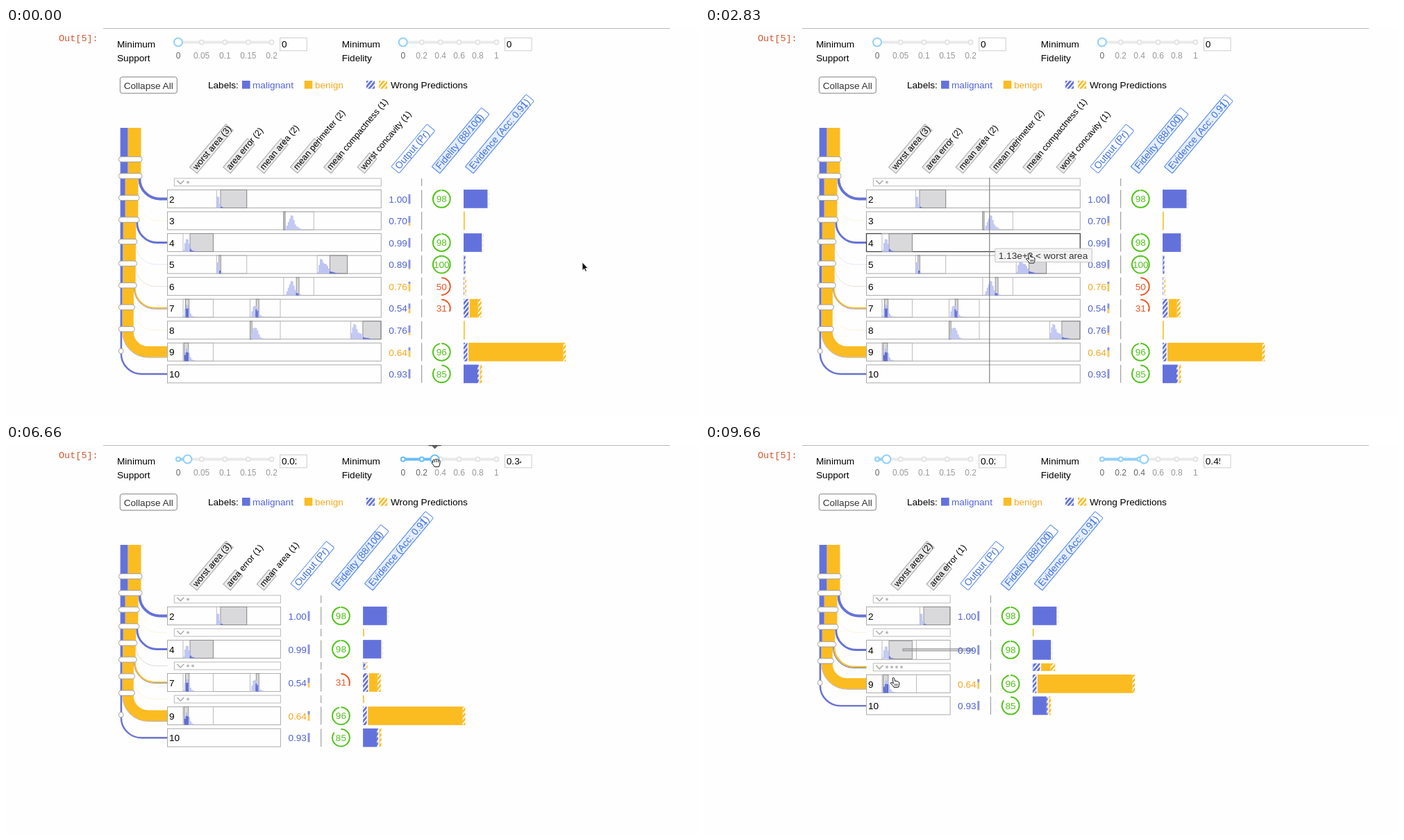
These frames come from a looping animation (998x561 px, 9.83 s). An HTML page:

```html
<!DOCTYPE html>
<html lang="en">
<head>
<meta charset="utf-8">
<title>Rule matrix</title>
<style>
html, body { margin: 0; width: 100%; height: 100%; overflow: hidden; background: #fefefe; }
svg { display: block; font: 13.6px "Liberation Sans", Arial, sans-serif; }
.out { font: 13.5px "Liberation Mono", monospace; }
.mark { font-size: 12px; text-anchor: middle; }
.mid { text-anchor: middle; }
.tick { font-size: 9.6px; }
</style>
</head>
<body>
<svg width="998" height="561" viewBox="0 0 998 561">
  <defs>
    <pattern id="blueStripe" width="4.6" height="4.6" patternUnits="userSpaceOnUse" patternTransform="rotate(40)">
      <rect width="2.9" height="4.6" fill="#6372db"/>
    </pattern>
    <pattern id="goldStripe" width="4.6" height="4.6" patternUnits="userSpaceOnUse" patternTransform="rotate(40)">
      <rect width="2.7" height="4.6" fill="#fbbc22"/>
    </pattern>
  </defs>
  <g id="scene"></g>
</svg>
<script>
const BLUE = '#6372db', GOLD = '#fbbc22', BLUE_TEXT = '#5163d6', GOLD_TEXT = '#f5a81c';
const LOOP = 9830, MOVE = 500, COL = 48.3, CELL = 43.4, GROW_X = 87, GROW_Y = 27;

// Per rule: probability, class (0 blue, 1 gold), fidelity,
// evidence [blue, blue wrong, gold, gold wrong], cells [column, from, to].
const RULES = {
  1: { ev: [0, 0, 0, 0] },
  2: { pr: '1.00', cls: 0, fid: 98, ev: [34.5, 0, 0, 1.2], cells: [[1, .13, 1]] },
  3: { pr: '0.70', cls: 0, ev: [0, 0, 1.6, 0], cells: [[3, 0, .05]] },
  4: { pr: '0.99', cls: 0, fid: 98, ev: [26.3, 0, 0, 1.2], cells: [[0, .23, 1]] },
  5: { pr: '0.89', cls: 0, fid: 100, ev: [.6, 2, 0, 0], cells: [[1, .08, .14], [4, .42, 1]] },
  6: { pr: '0.76', cls: 1, fid: 50, ev: [0, .8, 0, 1.6], cells: [[3, .42, .51]] },
  7: { pr: '0.54', cls: 0, fid: 31, ev: [0, 7.2, 12, 5], cells: [[0, .08, .2], [2, .2, .29]] },
  8: { pr: '0.76', cls: 0, ev: [0, 0, 1.6, 0], cells: [[2, 0, .06], [5, .4, 1]] },
  9: { pr: '0.64', cls: 1, fid: 96, ev: [0, 5.5, 136.5, 3.8], cells: [[0, .03, .18]] },
  10: { pr: '0.93', cls: 0, fid: 85, ev: [20, 1.8, 1, 2.2], cells: [] }
};
const FEATURES = ['worst area', 'area error', 'mean area', 'mean perimeter', 'mean compactness', 'worst concavity'];
const SHAPES = [[.11, 3], [.045, 1.8], [.15, 4], [.24, 6], [.16, 2], [.1, .9]];
const STAGES = [
  { hidden: [1], counts: [3, 2, 2, 2, 1, 1] },
  { hidden: [1, 3, 5, 6, 8], counts: [3, 1, 1] },
  { hidden: [1, 3, 5, 6, 7, 8], counts: [2, 1] }
];
const STAGE_START = [0, 4850, 7080];
const EXPANDS = [[1146, 2250], [8400, 9296]];
const POINTER = [
  [0, 830, 338], [500, 600, 326], [830, 400, 314], [1000, 300, 314], [1166, 281, 316],
  [2500, 281, 316], [2666, 330, 318], [2833, 466, 325], [3166, 680, 364], [3333, 738, 376],
  [3500, 720, 360], [4000, 400, 110], [4333, 246, 16], [4500, 250, 16], [4666, 261, 17],
  [4850, 261, 17], [5200, 400, 60], [5666, 540, 46], [6000, 571, 18], [6666, 619, 20],
  [7000, 632, 20], [7100, 632, 20], [7500, 440, 160], [8000, 266, 273], [8166, 273, 291],
  [8660, 276, 300], [9166, 274, 318], [9333, 271, 334], [9830, 271, 336]
];
const SUPPORT = [[4350, 0], [4666, .02]];
const FIDELITY = [[6000, 0], [6666, .34], [7000, .45]];

const clamp = v => Math.max(0, Math.min(1, v));
const lerp = (a, b, q) => a + (b - a) * q;
const ease = v => (v = clamp(v)) < .5 ? 4 * v ** 3 : 1 - 4 * (1 - v) ** 3;
const num = v => +v.toFixed(2);

function along(keys, t) {
  if (t <= keys[0][0]) return keys[0].slice(1);
  const i = keys.findIndex(k => k[0] >= t);
  if (i < 0) return keys[keys.length - 1].slice(1);
  const a = keys[i - 1], b = keys[i], q = (t - a[0]) / (b[0] - a[0]);
  return a.slice(1).map((v, j) => lerp(v, b[j + 1], q));
}

const rect = (x, y, w, h, fill = 'none', more = '') =>
  `<rect x="${num(x)}" y="${num(y)}" width="${num(Math.max(0, w))}" height="${num(Math.max(0, h))}" fill="${fill}" ${more}/>`;
const line = (x1, y1, x2, y2, c, w = 1) =>
  `<path d="M${num(x1)} ${num(y1)}L${num(x2)} ${num(y2)}" stroke="${c}" stroke-width="${w}"/>`;
const curve = (d, c, w, more = '') => `<path d="${d}" fill="none" stroke="${c}" stroke-width="${num(w)}" ${more}/>`;
const text = (x, y, s, fill = '#000', more = '') => `<text x="${num(x)}" y="${num(y)}" fill="${fill}" ${more}>${s}</text>`;
const circle = (x, y, r, fill, more = '') => `<circle cx="${num(x)}" cy="${num(y)}" r="${r}" fill="${fill}" ${more}/>`;
const tilted = (x, y, s) => `<g transform="translate(${num(x)} ${num(y)}) rotate(-50)">${s}</g>`;

function slider(x, label, keys, max, marks, t, held) {
  const [v] = along(keys, t), knob = x + v / max * 134.5;
  const blue = held ? '#69bdfb' : '#91d0fb';
  let s = text(x - 88, 28, 'Minimum') + text(x - 88, 48, label);
  s += rect(x, 18.6, 134.5, 3.9, '#e9e9e9') + rect(x, 18.6, knob - x, 3.9, blue);
  marks.forEach((m, i) => {
    const mx = x + 134.5 * i / (marks.length - 1), on = m <= v;
    s += circle(mx, 20.5, 3, '#fff', `stroke="${on ? blue : '#e4e4e4'}" stroke-width="2"`);
    s += text(mx, 44, m, on ? '#666' : '#999', 'class="mark"');
  });
  s += circle(knob, 20.5, 6, '#fff', `stroke="${blue}" stroke-width="2"`);
  if (held) s += `<path d="M${num(knob - 10)} -2h20q0 3.5 -3 3.5h-3l-4 4.2l-4 -4.2h-3q-3 0 -3 -3.5z" fill="#5c5c5c"/>`;
  s += rect(x + 146.7, 14.2, 38.5, 18.6, '#fff', 'stroke="#ccc"');
  return s + `<svg x="${x + 147}" y="14" width="23" height="19">${text(2, 14.3, v ? v.toFixed(2) : '0')}</svg>`;
}

function controls(t) {
  const heldA = t > 4200 && t < 4840, heldB = t > 5950 && t < 7070;
  return line(140, .5, 956, .5, '#b8b8b8') + text(76, 19, 'Out[5]:', '#d0572f', 'class="out"') +
    slider(248, 'Support', SUPPORT, .2, [0, .05, .1, .15, .2], t, heldA) +
    slider(571.8, 'Fidelity', FIDELITY, 1, [0, .2, .4, .6, .8, 1], t, heldB) +
    rect(164.3, 70.7, 82, 23.4, '#fff', 'rx="3" stroke="#808080"') +
    text(205.2, 87.5, 'Collapse All', '#333', 'class="mid"') +
    text(291, 87.3, 'Labels:') +
    rect(340, 76, 11.6, 11.6, BLUE) + text(355, 87.3, 'malignant', BLUE_TEXT) +
    rect(429.7, 76, 11.6, 11.6, GOLD) + text(445, 87.3, 'benign', GOLD_TEXT) +
    rect(519, 76, 12, 11.6, 'url(#blueStripe)') + rect(537, 76, 12, 11.6, 'url(#goldStripe)') +
    text(554, 87.3, 'Wrong Predictions');
}

// Consecutive hidden rules share one thin row.
function stack(stage) {
  const rows = [];
  let top = 216.4;
  for (let id = 1; id <= 10; id++) {
    const full = !STAGES[stage].hidden.includes(id), last = rows[rows.length - 1];
    if (!full && last && !last.full) { last.ids.push(id); continue; }
    const h = full ? 27.05 : 12;
    rows.push({ ids: [id], full, y: top + h / 2 });
    top += h + 4.5;
  }
  return rows;
}

function layout(t) {
  const stage = STAGE_START.filter(s => t >= s).length - 1;
  const q = stage ? ease((t - STAGE_START[stage]) / MOVE) : 1;
  const open = EXPANDS.find(e => t > e[0] && t < e[1] + MOVE);
  const p = open ? ease((t - open[0]) / MOVE) - ease((t - open[1]) / MOVE) : 0;
  const entering = !!open && t < open[1];
  const prev = {};
  if (stage) for (const r of stack(stage - 1)) for (const id of r.ids) prev[id] = r.y;
  const rows = stack(stage);
  for (const r of rows) {
    r.h = r.full ? 26 : 11;
    r.y = lerp(prev[r.ids[0]] ?? r.y, r.y, q);
    r.textY = r.y;
    if (r.ids[0] === 4) {
      r.textY += (entering ? 1 : p) * GROW_Y / 2;
      r.h += GROW_Y * p;
      r.y += GROW_Y * p / 2;
    } else if (r.ids[0] > 4) r.textY = r.y += GROW_Y * p;
    r.ev = [0, 1, 2, 3].map(i => r.ids.reduce((sum, id) => sum + RULES[id].ev[i], 0));
  }
  const count = s => STAGES[Math.max(0, s)].counts.length;
  const right = 250.5 + COL * lerp(count(stage - 1), count(stage), q) + GROW_X * p;
  return { stage, rows, p, entering, right, colX: i => 255 + COL * i + (i ? GROW_X * p : 0) };
}

// Both colours of a branch turn around one centre, so they stay parallel.
function branch(x, w, base, yc, color) {
  const turn = x + w / 2, r = 29 + base - turn;
  return curve(`M${num(turn)} ${num(yc - 33)}V${num(yc - 29)}A${num(r)} ${num(r)} 0 0 0 ${num(turn + r)} ${num(yc - 29 + r)}H232.5`,
    color, Math.max(.25, w), w < .5 ? 'opacity=".6"' : '');
}

function tree(L) {
  const K = .112, X = 164.6;
  let b = 0, g = 0, stem = '', gaps = '', nodes = '', top = 144;
  for (const r of L.rows) { b += (r.ev[0] + r.ev[1]) * K; g += (r.ev[2] + r.ev[3]) * K; }
  for (const r of L.rows) {
    const y = r.y - 33, rb = (r.ev[0] + r.ev[1]) * K, rg = (r.ev[2] + r.ev[3]) * K;
    const opening = r.ids[0] === 4 && L.entering;
    const node = rect(162.3, (opening ? r.textY - 33 : y) - 3.7, Math.max(6.4, b + g + 4), 7.4, '#fff',
      `rx="3.7" stroke="#999" stroke-width=".9" ${opening && L.p < 1 ? 'opacity=".3"' : ''}`);
    nodes += node;
    stem += rect(X, top, b, y - top, BLUE) + rect(X + b, top, g, y - top, GOLD);
    if (opening) {
      for (const gy of [r.y - 37, r.y - 3]) gaps += rect(163, gy, 23.5, 10 * (1 - L.p), '#fefefe');
    }
    b -= rb; g -= rg;
    const x = X + b + g, base = x + (rb + rg) / 2;
    if (rb) stem += branch(x, rb, base, r.y, BLUE);
    if (rg) stem += branch(x + rb, rg, base, r.y, GOLD);
    top = y;
  }
  return stem + gaps + nodes;
}

function bars(col, x, y, w, from, to) {
  const [m, k] = SHAPES[col], n = 22, bw = w / n;
  let s = '';
  for (let i = 0; i < n; i++) {
    const u = (i + .5) / n;
    const h = 23 * (u / m * Math.exp(1 - u / m)) ** k * (.85 + .15 * Math.sin(i * 5 + col));
    if (h < .3) continue;
    s += rect(x + i * bw, y + 12.7 - h, bw - .1, h, '#bac1f3');
    if (u >= from && u <= to) s += rect(x + i * bw, y + 12.7 - h * .7, bw - .1, h * .7, '#5563cf');
  }
  return s;
}

function cell(L, r, [col, from, to], hot) {
  const x = L.colX(col), w = CELL + (col ? 0 : GROW_X * L.p);
  const big = r.ids[0] === 4 && L.p > 0, bw = big ? CELL : w;
  const shade = hot ? 'rgba(110,110,110,.62)' : 'rgba(150,150,155,.36)';
  const h = big ? r.h : 26;
  let s = rect(x, r.y - h / 2, w, h, 'none', 'stroke="#b4b4b4" stroke-width=".9"');
  s += `<g opacity="${num(big ? 1 - L.p : 1)}">` +
    rect(x + from * bw, r.y - 13, (to - from) * bw, 26, shade, 'stroke="#888" stroke-width=".9"') +
    bars(col, x, r.y, bw, from, to) + '</g>';
  if (!big) return s;
  const full = CELL + GROW_X, tall = 43 * (L.entering ? 1 : L.p);
  const mid = L.entering ? r.textY : r.y;
  s += rect(x + from * full, mid - tall / 2, (1 - from) * full, tall, 'rgba(150,150,155,.36)', 'stroke="#888" stroke-width=".9"');
  return L.entering ? s + stream(x, mid, L.p) : s;
}

function stream(x, y, p) {
  const area = (peak, spread, amp, color) => {
    let up = '', down = '';
    for (let i = 0; i <= 40; i++) {
      const u = i * 2.5, h = amp * p * Math.exp(-(((u - peak) / spread) ** 2));
      up += `L${num(x + u)} ${num(y - h)}`;
      down = `L${num(x + u)} ${num(y + h)}` + down;
    }
    return `<path d="M${num(x)} ${num(y)}${up}${down}Z" fill="${color}"/>`;
  };
  return area(28, 16, 8, BLUE) + area(12, 9, 19, GOLD);
}

function evidence(x, r) {
  const fills = [BLUE, 'url(#blueStripe)', GOLD, 'url(#goldStripe)'];
  const h = r.full ? r.h + .7 : r.h;
  let s = '';
  r.ev.forEach((w, i) => {
    if (i === 2 && r.ev[0] + r.ev[1]) x += 1.5;
    if (w) s += rect(x, r.y - h / 2, w, h, fills[i], i === 3 && w < 1.5 ? 'opacity=".4"' : '');
    x += w;
  });
  return s;
}

function outputs(L, r) {
  const R = L.right, y = r.y, d = RULES[r.ids[0]];
  let s = line(R + 58.3, y - r.h / 2, R + 58.3, y + r.h / 2, '#a0a0a0', 1.2) + evidence(R + 118.7, r);
  if (!r.full) return s;
  const blue = d.cls ? 1 - d.pr : +d.pr;
  s += text(R + 11, y + 5.3, d.pr, d.cls ? GOLD_TEXT : BLUE_TEXT);
  s += rect(R + 39.2, y - 6.8, 2.9, 14 * blue, '#8791e3') + rect(R + 39.2, y - 6.8 + 14 * blue, 2.9, 14 * (1 - blue), '#f8c95b');
  if (d.fid) {
    const c = d.fid > 80 ? '#52c41a' : '#ee5524', len = 2 * Math.PI * 12.4;
    s += circle(R + 87, y, 12.4, 'none', `stroke="${c}" stroke-width="2" stroke-dasharray="${num(len * d.fid / 100)} ${num(len)}" transform="rotate(-90 ${num(R + 87)} ${num(y)})"`);
    s += text(R + 87, y + 4.9, d.fid, c, 'class="mid"');
  }
  return s;
}

function matrix(L, hover) {
  let s = '';
  for (const r of L.rows) {
    const id = r.ids[0], top = r.y - r.h / 2;
    if (r.full) {
      const hot = hover.row === id;
      s += rect(232.5, top, L.right - 232.5, r.h, 'none', `stroke="${hot ? '#444' : '#aaa'}" stroke-width="${hot ? 1.3 : 1}"`);
      s += text(235, r.textY + 5.2, id);
      for (const c of RULES[id].cells) {
        const gx = L.colX(c[0]);
        s += cell(L, r, c, hot && hover.x > gx + c[1] * CELL && hover.x < gx + c[2] * CELL);
      }
    } else {
      s += rect(242.3, top, L.right - 242.3, r.h, 'none', 'stroke="#bbb"');
      s += curve(`M246.3 ${num(r.y - 2.5)}l5 5l5 -5`, '#aaa', 1.5);
      r.ids.forEach((_, i) => { s += circle(262 + i * 7, r.y, 2, '#bbb'); });
    }
    s += outputs(L, r);
  }
  return s;
}

function headers(L) {
  const counts = STAGES[L.stage].counts, R = L.right;
  let s = '';
  counts.forEach((n, i) => {
    const bold = L.entering && !i;
    const x = L.colX(i) + (i ? 20 : 20 + GROW_X * L.p / 2);
    s += tilted(x, bold ? 201 : 209.5,
      rect(0, -13.6, 81 * n / counts[0], 13.6, '#ebebeb', 'stroke="#a8a8a8"') +
      text(3, -3, `${FEATURES[i]} (${n})`, '#000', `font-size="12.7" ${bold ? 'font-weight="bold"' : ''}`));
  });
  if (L.entering) {
    s += line(255, 211.5, 385.8, 211.5, '#222', 1.3);
    [[0, '92.1'], [.02, '224'], [.13, '734'], [.2, '985'], [.23, '1,135'], [1, '4,254']].forEach(([f, label]) => {
      const x = 255.3 + f * 130.5;
      s += circle(x, 211, 1.3, '#222') + tilted(x, 209, text(0, 0, label, '#000', 'class="tick"'));
    });
  }
  const box = (x, label, w, part) => tilted(R + x, 209.5,
    rect(0, -15, w, 15, '#fff', 'rx="1.5" stroke="#5b8def"') +
    (part ? rect(0, -15, w * part, 15, '#e4eefc', 'stroke="#5b8def"') : '') +
    text(4, -3, label, '#3f6fe2', 'font-size="13.8"'));
  return s + box(26, 'Output (Pr)', 80) + box(84.5, 'Fidelity (88/100)', 111, .88) +
    box(132.7, 'Evidence (Acc: 0.91)', 136, .91);
}

function pointer(x, y, kind) {
  const paths = {
    arrow: ['M0 0V11.5L2.7 9.2L4.5 13.2L6.3 12.4L4.6 8.5H8Z', '#111', '#fff'],
    hand: ['M-1 .8Q.5 -.8 1.6 1L2.6 5.2Q4 4.4 5 5.5Q6.6 5 7.2 6.2Q8.8 6.2 8.8 8Q8.9 11.5 7.4 14H1Q-.5 11 -3.6 8.6Q-3.8 6.6 -1.6 7.4L.2 8.8Z', '#fff', '#111'],
    grab: ['M-4.6 3Q-4 .5 -2 1.6Q-1 -.6 .8 .9Q2.6 -.2 3.6 1.6Q6 1.4 6 4Q6.2 8 4.4 11.4H-2Q-3.5 8.5 -5.6 6.6Q-6 4.6 -4 5Z', '#fff', '#111']
  };
  const [d, fill, stroke] = paths[kind];
  const fingers = kind === 'grab' ? curve('M-1.8 2V5M.8 1.5V5M3.4 2V5', '#111', .9) :
    kind === 'hand' ? curve('M2.4 9V12M4.3 9V12M6.2 9V12', '#111', .8) : '';
  return `<g transform="translate(${num(x)} ${num(y)})"><path d="${d}" fill="${fill}" stroke="${stroke}" stroke-width="${kind === 'arrow' ? .7 : 1}" stroke-linejoin="round"/>${fingers}</g>`;
}

function render(t) {
  const L = layout(t), [cx, cy] = along(POINTER, t);
  const [hx, hy] = along(POINTER, t - 70); // hover trails the pointer
  const last = L.rows[L.rows.length - 1], bottom = last.y + 13;
  const over = (x, y) => x > 232 && x < L.right && y > 216 && y < bottom;
  const hovering = !L.p && over(hx, hy);
  const hit = hovering && L.rows.find(r => r.full && Math.abs(r.y - hy) < 15);
  const hover = { x: hx, row: hit ? hit.ids[0] : L.entering ? 4 : 0 };
  let s = controls(t) + tree(L) + matrix(L, hover) + headers(L);
  if (hovering) s += line(hx + .5, 216, hx + .5, bottom, '#777', 1.1);
  if (hovering && hover.row === 4) {
    s += rect(hx + 8.5, hy - 4, 139.5, 19.5, 'rgba(245,245,245,.92)', 'stroke="#c4c4c4" rx="1"') +
      text(hx + 13.5, hy + 10.6, '1.13e+3 &lt; worst area', '#333');
  }
  const holding = (t > 4200 && t < 4900) || (t > 5950 && t < 7150);
  return s + pointer(cx, cy, holding ? 'grab' : over(cx, cy) ? 'hand' : 'arrow');
}

const scene = document.getElementById('scene');
const start = performance.now();
let shown = -1;
function tick() {
  const t = (performance.now() - start) % LOOP;
  const step = Math.min(58, Math.floor((t + 6.7) * .006)); // six pictures a second
  if (step !== shown) {
    shown = step;
    scene.innerHTML = render(step * 1000 / 6);
  }
  requestAnimationFrame(tick);
}
tick();
</script>
</body>
</html>
```
